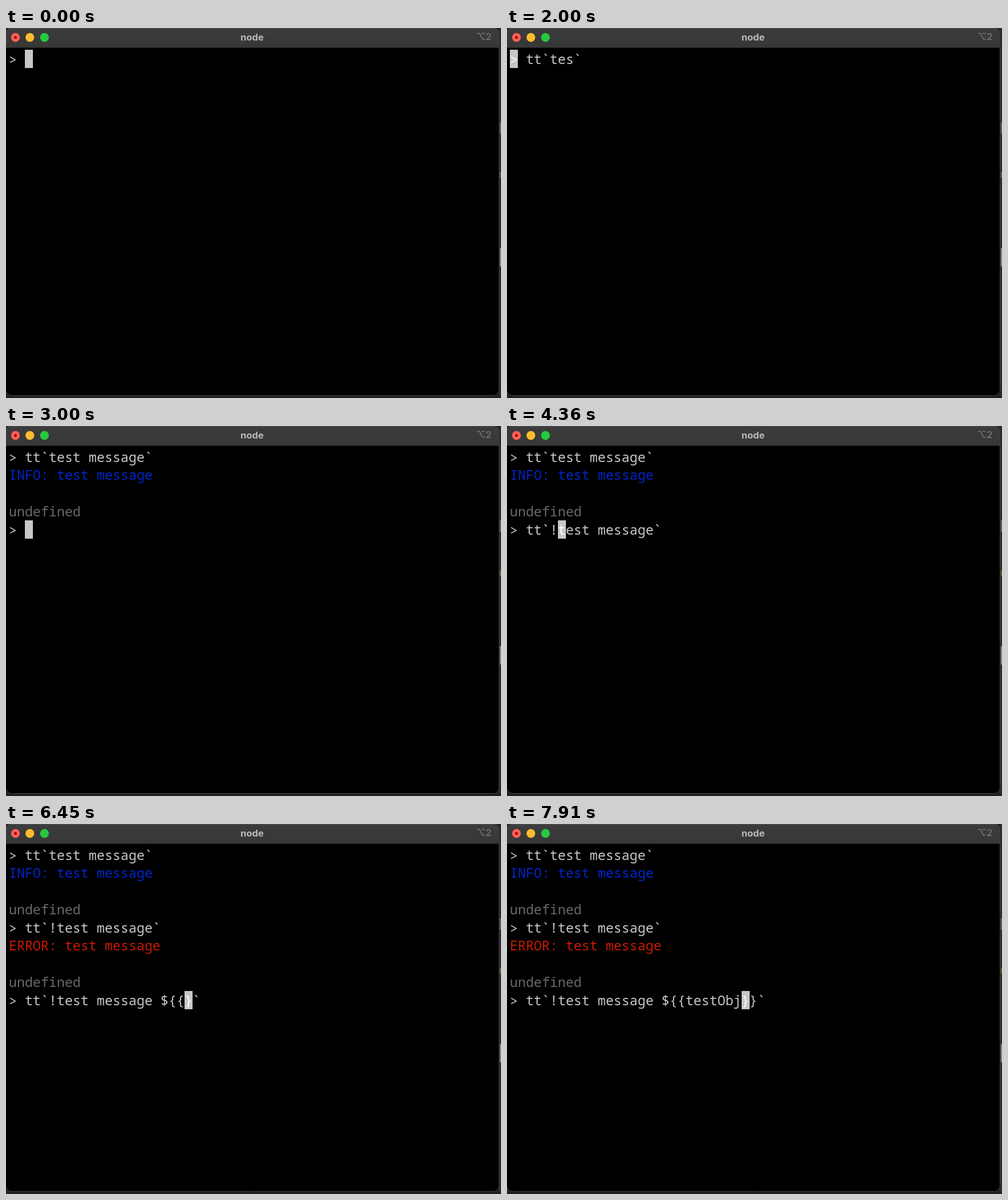
These frames come from a looping animation (865 by 647 pixels, 8000 ms). An HTML page with a canvas:

```html
<!DOCTYPE html>
<html>
<head>
<meta charset="utf-8">
<title>Terminal</title>
<style>
html, body { margin: 0; width: 100%; height: 100%; overflow: hidden; background: #1c2424; }
canvas { display: block; }
</style>
</head>
<body>
<canvas id="stage" width="865" height="647"></canvas>
<script>
const LOOP = 8000, CELL = 13.95, ROW = 31.75, LEFT = 5, TOP = 38;
const GREY = '#c7c7c7';
const ctx = document.getElementById('stage').getContext('2d');

// Each step: start time, prompt row, typed text, cursor column
const steps = [
  [0, 0, '', 2],
  [820, 0, 't', 3],
  [1000, 0, 'tt', 4],
  [1360, 0, 'tt``', 6],
  [1550, 0, 'tt``', 5],
  [1910, 0, 'tt`te`', 7],
  [2000, 0, 'tt`tes`', 0],
  [2090, 0, 'tt`test`', 9],
  [2180, 0, 'tt`test `', 10],
  [2360, 0, 'tt`test me`', 12],
  [2550, 0, 'tt`test mes`', 13],
  [2640, 0, 'tt`test mess`', 14],
  [2730, 0, 'tt`test messag`', 0],
  [2820, 0, 'tt`test message`', 17],
  [3000, 4, '', 2],
  [3450, 4, 'tt`test message`', 18],
  [3730, 4, 'tt`test message`', 17],
  [4000, 4, 'tt`test message`', 10],
  [4090, 4, 'tt`test message`', 5],
  [4360, 4, 'tt`!test message`', 6],
  [4550, 8, '', 2],
  [5180, 8, 'tt`!test message`', 19],
  [5450, 8, 'tt`!test message`', 18],
  [5640, 8, 'tt`!test message `', 19],
  [5910, 8, 'tt`!test message $`', 20],
  [6000, 8, 'tt`!test message ${`', 0],
  [6090, 8, 'tt`!test message ${}`', 22],
  [6270, 8, 'tt`!test message ${}`', 21],
  [6450, 8, 'tt`!test message ${{}`', 22],
  [6540, 8, 'tt`!test message ${{}}`', 23],
  [6640, 8, 'tt`!test message ${{}}`', 22],
  [7090, 8, 'tt`!test message ${{te}}`', 24],
  [7180, 8, 'tt`!test message ${{tes}}`', 0],
  [7270, 8, 'tt`!test message ${{test}}`', 26],
  [7640, 8, 'tt`!test message ${{testO}}`', 27],
  [7730, 8, 'tt`!test message ${{testOb}}`', 28],
  [7910, 8, 'tt`!test message ${{testObj}}`', 29]
];

const history = [
  ['> tt`test message`', GREY],
  ['INFO: test message', '#0225c7'],
  ['', GREY],
  ['undefined', '#686868'],
  ['> tt`!test message`', GREY],
  ['ERROR: test message', '#c91b00'],
  ['', GREY],
  ['undefined', '#686868']
];

function disc(x, y, r, color) {
  ctx.fillStyle = color;
  ctx.beginPath();
  ctx.arc(x, y, r, 0, Math.PI * 2);
  ctx.fill();
}

function rect(x, y, w, h, color) {
  ctx.fillStyle = color;
  ctx.fillRect(x, y, w, h);
}

function print(text, row, color, col = 0) {
  ctx.font = '23.25px "Noto Sans Mono", "DejaVu Sans Mono", monospace';
  ctx.textAlign = 'left';
  ctx.fillStyle = color;
  [...text].forEach((ch, i) => {
    const drop = ch === '>' ? 1.5 : 0;
    ctx.fillText(ch, LEFT + (col + i) * CELL, TOP + row * ROW + 24.7 + drop);
  });
}

function drawWindow() {
  rect(0, 0, 865, 647, '#1c2424');
  rect(862, 0, 3, 647, '#2b2b2a');
  rect(863, 165, 2, 20, '#666562');
  rect(863, 252, 2, 10, '#765c2c');
  rect(863, 385, 2, 32, '#8a8782');
  rect(0, 644, 865, 3, '#1d2020');

  ctx.save();
  ctx.beginPath();
  ctx.roundRect(-0.5, -0.5, 862, 643, 10);
  ctx.clip();
  rect(0, 0, 865, 647, '#000');
  const bar = ctx.createLinearGradient(0, 0, 0, 34);
  bar.addColorStop(0, '#3c3c3c');
  bar.addColorStop(1, '#373737');
  rect(0, 0, 865, 34, bar);
  rect(0, 0, 865, 1, '#505050');
  rect(0, 34, 865, 1, '#1c1c1c');
  ctx.restore();
  ctx.strokeStyle = '#3d4343';
  ctx.lineWidth = 1;
  ctx.stroke();

  disc(16.5, 16.5, 7.7, '#ff5f57');
  disc(16.5, 16.5, 2.5, '#8c0b05');
  disc(41.7, 16.5, 7.7, '#febc2e');
  disc(67.2, 16.5, 7.7, '#28c840');

  ctx.textAlign = 'center';
  ctx.fillStyle = '#b9b9b9';
  ctx.font = 'bold 16.5px Inter, sans-serif';
  ctx.fillText('node', 430, 21.5);

  // Option-key sign and window number
  ctx.strokeStyle = ctx.fillStyle = '#777';
  ctx.lineWidth = 1.6;
  ctx.stroke(new Path2D('M823 9.5h4.5l5 10h4.5M831 9.5h6'));
  ctx.font = '500 16.5px Inter, sans-serif';
  ctx.fillText('2', 843.3, 20.5);
}

function draw(now) {
  const t = now % LOOP;
  const [, row, typed, col] = steps.findLast(s => s[0] <= t);
  const line = '> ' + typed;
  drawWindow();
  history.slice(0, row).forEach(([text, color], i) => print(text, i, color));
  print(line, row, GREY);
  rect(Math.round(LEFT + col * CELL), Math.round(TOP + row * ROW), 14, 32, GREY);
  print(line[col] || '', row, '#fff', col);
  requestAnimationFrame(draw);
}
requestAnimationFrame(draw);
</script>
</body>
</html>
```
